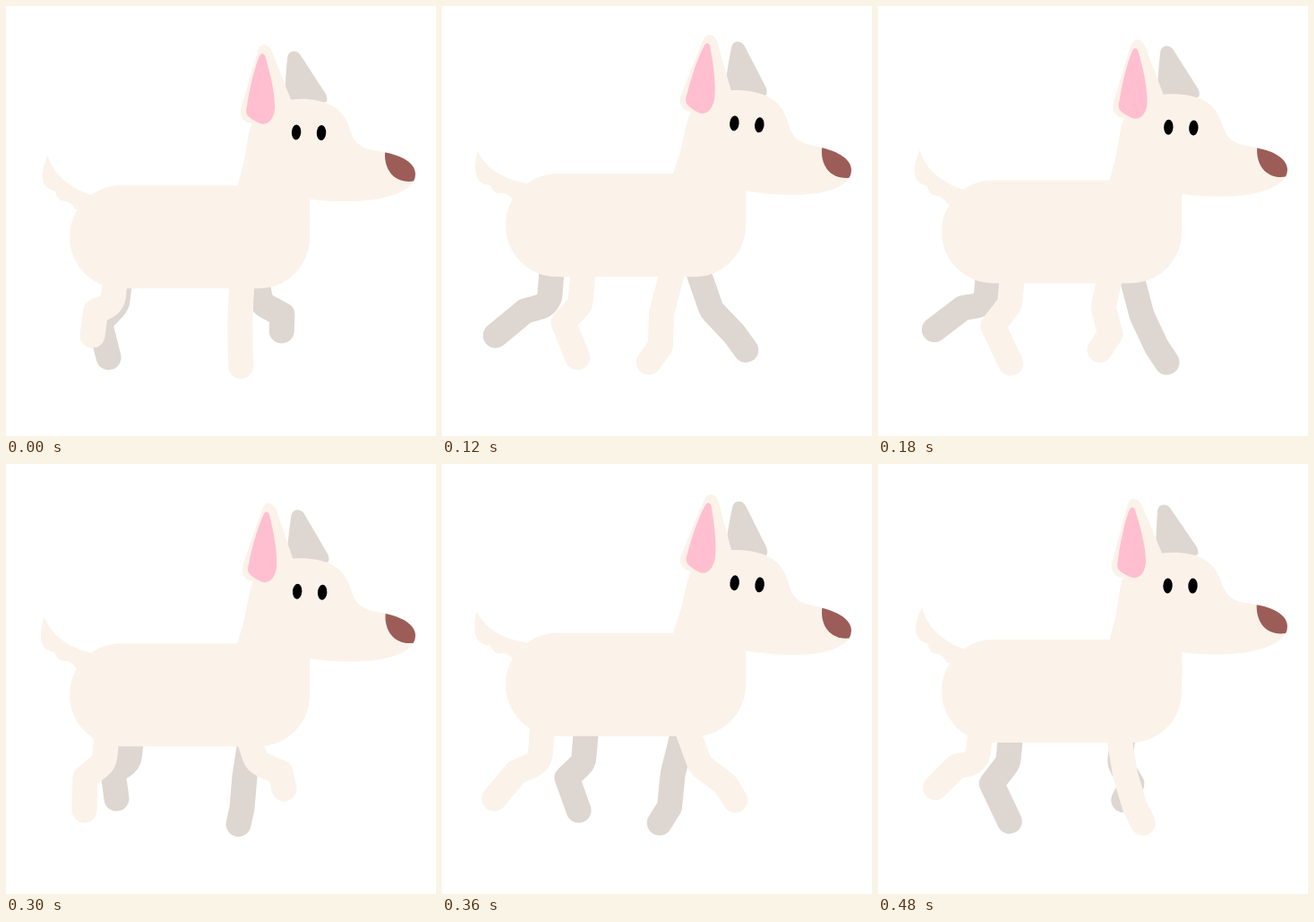
These frames come from a looping animation (480 px wide and 480 px high, 540 ms). An HTML page with a canvas:

```html
<!DOCTYPE html>
<html lang="en">
<head>
<meta charset="utf-8">
<title>Walking dog</title>
<style>
  html, body { margin: 0; width: 100%; height: 100%; overflow: hidden; background: #fff; }
  canvas { display: block; width: 100vw; height: 100vh; }
</style>
</head>
<body>
<canvas width="480" height="480"></canvas>
<script>
const LOOP = 540, STEPS = 9;
const COAT = '#fbf2e9', SHADE = '#ded6d0', PINK = '#ffbfd0', NOSE = '#9c5d58';
const ctx = document.querySelector('canvas').getContext('2d');

const shapes = {
  tail: 'M47 166Q49 175 58 187Q72 203 96 211L90 225L78 227Q72 217 65 217Q57 217 55 206Q40 203 41 187Q42 178 47 166Z',
  body: 'M128.5 200H339V258A57 57 0 0 1 282 315H128.5A57.5 57.5 0 0 1 128.5 200Z',
  head: 'M258 202L266 172C270 150 271 128 285 113L318 104C350 101 373 110 381 130C387 144 388 156 408 160L423 163C440 166 457 174 457 187C457 206 425 217 385 217.5Q360 218 339 215V240H258Z',
  nose: 'M423 163C440 166 457 174 457 187Q457 192 455 195C435 198 422 184 423 163Z',
  farEar: 'M314 57Q315 50 321 50Q326 50 329 55L357 98Q359 102 358 106L340 115H312L311 104Q312 75 314 57Z',
  ear: 'M281 49Q284 42 289 43Q294 44 297 51L318 104L300 135L270 130Q260 126 262 114Z',
  innerEar: 'M283 55Q286 50 289 55C294 72 300 95 300 112C300 124 293 135 282 130Q271 125 269 121Q267 117 269 111C271 95 278 65 283 55Z',
};
for (const name in shapes) shapes[name] = new Path2D(shapes[name]);

const radians = degrees => degrees * Math.PI / 180;
const cos = degrees => Math.cos(radians(degrees));

// A swing around a mean, greatest at the peak angle, with an optional double-speed part
const wave = (angle, mean, swing, peak, swing2 = 0, peak2 = 0) =>
  mean + swing * cos(angle - peak) + swing2 * cos(2 * (angle - peak2));

// Each gait gives hip x, then the knee, ankle and foot points
function frontGait(a) {
  const lift = wave(a, 0, 20, 10, -5, 10);
  return [
    wave(a, 265, 4, 255),
    wave(a, 267, 22, 255), wave(a, 341, 9, 0),
    wave(a, 279, 37, 242), 369 + lift,
    wave(a, 279, 49, 250), 387 + lift,
  ];
}

function hindGait(a) {
  const knee = wave(a, 125, 22, 85, -8);
  return [
    knee + 4,
    knee, 333,
    wave(a, 104, 26, 85, -6), wave(a, 347, 10, 130),
    wave(a, 101, 52, 95), wave(a, 380, 19, 130),
  ];
}

function leg([hip, kneeX, kneeY, ankleX, ankleY, footX, footY], top, color, shift = 0) {
  ctx.save();
  ctx.translate(shift, 0);
  ctx.beginPath();
  ctx.moveTo(hip, top + 95);
  ctx.arcTo(kneeX, kneeY, ankleX, ankleY, 16);
  ctx.lineTo(ankleX, ankleY);
  ctx.lineTo(footX, footY);
  ctx.strokeStyle = color;
  ctx.stroke();
  ctx.restore();
}

function fill(name, color) {
  ctx.fillStyle = color;
  ctx.fill(shapes[name]);
}

function turned(x, y, degrees, draw) {
  ctx.save();
  ctx.translate(x, y);
  ctx.rotate(radians(degrees));
  ctx.translate(-x, -y);
  draw();
  ctx.restore();
}

function eye(x, y) {
  ctx.beginPath();
  ctx.ellipse(x, y, 5.2, 8.5, 0.05, 0, 2 * Math.PI);
  ctx.fillStyle = '#000';
  ctx.fill();
}

function draw(stride) {
  // The body bounces twice per stride
  const bounce = 2 * stride;
  const top = wave(bounce, 194.5, 6, -12, 2, 45);
  const tilt = wave(bounce, 1.2, 2, 125);
  const wag = wave(bounce, -4, 7, -60);

  ctx.clearRect(0, 0, 480, 480);
  ctx.lineWidth = 28;
  ctx.lineCap = ctx.lineJoin = 'round';

  leg(hindGait(stride + 180), top, SHADE, 9);
  leg(frontGait(stride + 180), top, SHADE, 12);

  ctx.save();
  ctx.translate(0, top - 200);
  turned(95, 215, wag, () => fill('tail', COAT));
  fill('body', COAT);
  turned(262, 190, tilt, () => {
    turned(335, 108, tilt, () => fill('farEar', SHADE));
    fill('head', COAT);
    fill('nose', NOSE);
    eye(324, 140.5);
    eye(352, 141);
    turned(285, 125, tilt, () => {
      fill('ear', COAT);
      fill('innerEar', PINK);
    });
  });
  ctx.restore();

  leg(hindGait(stride), top, COAT);
  leg(frontGait(stride), top, COAT);
}

const start = performance.now();
function tick() {
  const progress = (performance.now() - start) % LOOP / LOOP;
  draw(Math.floor(progress * STEPS) * 360 / STEPS);
  requestAnimationFrame(tick);
}
tick();
</script>
</body>
</html>
```
